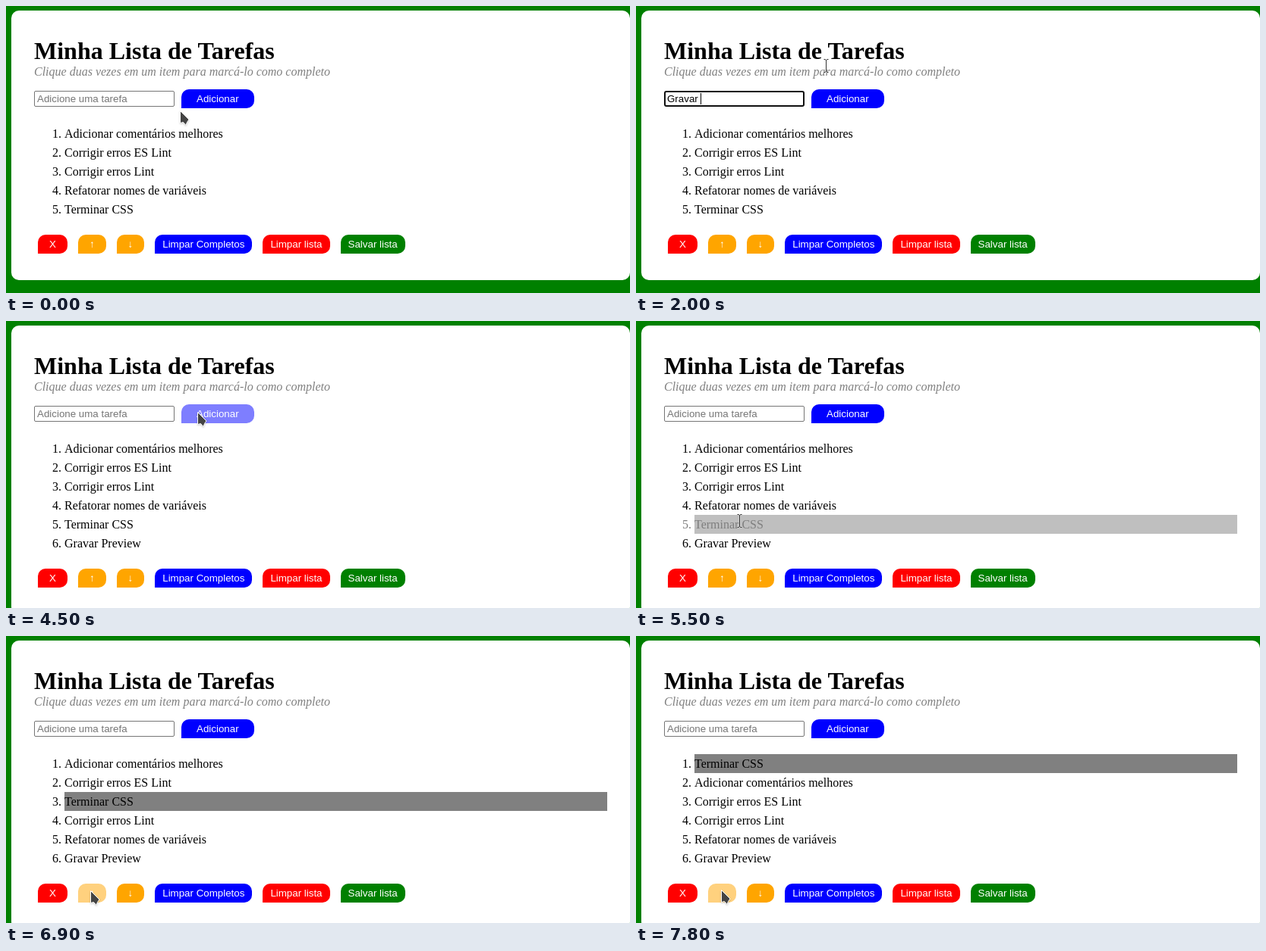
An HTML page that plays this animation: 822 by 379 pixels, repeating every 8 s.

```html
<!DOCTYPE html>
<html lang="pt">
<head>
<meta charset="utf-8">
<style>
html, body { margin: 0; width: 100%; height: 100%; overflow: hidden; background: green; }
body { position: relative; font: 16px "Liberation Serif", serif; color: #000; }
body > * { position: absolute; margin: 0; white-space: pre; }
#card { left: 7px; top: 6px; width: 815px; height: 356px; border-radius: 10px; background: #fff; }
h1 { left: 37px; top: 41px; font-size: 32px; }
#hint { left: 37px; top: 78px; font-style: italic; color: gray; }
#field, .btn { font: 13.3333px/15px "Liberation Sans", sans-serif; }
#field { left: 37px; top: 112px; width: 185px; height: 21px; box-sizing: border-box;
  border: 1px solid #767676; border-radius: 2px; padding: 2px 3px; background: #fff; }
#field.focus { border: 2px solid #101010; border-radius: 3px; padding: 1px 2px; }
#caret { position: absolute; width: 1px; height: 15px; background: #000; }
#placeholder { color: #757575; }
.btn { padding: 5px 10px; border-radius: 10px 10px 10px 0; color: #fff; background: blue; }
#add { left: 231px; top: 110px; padding: 5px 20px; }
#bar { left: 42px; top: 302px; display: flex; gap: 14px; }
.narrow { padding: 5px 15px; }
.red { background: red; }
.orange { background: orange; }
.green { background: green; }
ol { left: 37px; top: 156px; width: 755px; box-sizing: border-box; padding: 0 0 0 40px; line-height: 25px; }
li.selected { background: gray; }
.hover { opacity: .5; }
#cursor { left: 0; top: 0; overflow: visible; }
#arrow { filter: drop-shadow(0 1px 1px rgba(0, 0, 0, .2)); }
</style>
</head>
<body>
<div id="card"></div>
<h1>Minha Lista de Tarefas</h1>
<div id="hint">Clique duas vezes em um item para marcá-lo como completo</div>
<div id="field"><span id="typed"></span><i id="caret"></i><span id="placeholder">Adicione uma tarefa</span></div>
<div id="add" class="btn">Adicionar</div>
<ol><li></li><li></li><li></li><li></li><li></li><li></li></ol>
<div id="bar"><span class="btn narrow red">X</span><span class="btn narrow orange">↑</span><span class="btn narrow orange">↓</span><span class="btn">Limpar Completos</span><span class="btn red">Limpar lista</span><span class="btn green">Salvar lista</span></div>
<svg id="cursor" width="1" height="1">
  <path id="arrow" d="M.5 .5V16.5L4.5 15.5L8 19.5L9.5 15.5L12 12Z" fill="#444" stroke="#fff"/>
  <g id="beam" fill="none">
    <path d="M-2.5 -8.5H-1L.5 -7.5L2 -8.5H3.5M.5 -7.5V7.5M-2.5 8.5H-1L.5 7.5L2 8.5H3.5" stroke="#fff" stroke-width="2" opacity=".5"/>
    <path d="M-2.5 -8.5H-1L.5 -7.5L2 -8.5H3.5M.5 -7.5V7.5M-2.5 8.5H-1L.5 7.5L2 8.5H3.5" stroke="#333"/>
  </g>
</svg>
<script>
const LOOP = 8000, STEP = 100;
const NEW_TASK = 'Gravar Preview', MOVED = 'Terminar CSS';
const TASKS = ['Adicionar comentários melhores', 'Corrigir erros ES Lint', 'Corrigir erros Lint', 'Refatorar nomes de variáveis'];
const ADDED = 4400, SELECTED = 5500;
const MOVES_UP = [6600, 6900, 7400, 7800];
// time of each keystroke; equal times land in the same step
const KEYSTROKES = [1200, 1400, 1500, 1700, 1700, 1900, 2000, 2400, 2900, 2900, 3000, 3200, 3400, 3500];
// time, x, y, pointer shape
const PATH = [
  [0, 229, 138, 'arrow'], [200, 206, 124, 'beam'], [300, 194, 116, 'beam'], [400, 194, 118, 'beam'],
  [500, 194, 118, 'beam'], [700, 250, 79, 'beam'], [3800, 250, 79, 'beam'], [4000, 252, 99, 'arrow'],
  [4200, 252, 120, 'arrow'], [4500, 252, 120, 'arrow'], [4900, 150, 245, 'beam'], [5000, 136, 262, 'beam'],
  [5100, 136, 262, 'beam'], [5200, 136, 266, 'beam'], [5400, 136, 266, 'beam'], [5500, 136, 264, 'beam'],
  [5700, 136, 264, 'beam'], [5800, 134, 283, 'beam'], [5900, 131, 298, 'arrow'], [6200, 123, 330, 'arrow'],
  [6400, 123, 330, 'arrow'], [6600, 111, 336, 'arrow'], [7600, 111, 336, 'arrow'], [7700, 112, 335, 'arrow'],
  [LOOP, 112, 335, 'arrow']
];

const $ = id => document.getElementById(id);
const items = [...document.querySelectorAll('li')];
const hoverables = [...items, ...document.querySelectorAll('.btn')];
const show = (el, on) => { el.style.display = on ? '' : 'none'; };
const countPassed = (times, t) => times.filter(time => time <= t).length;

function pointerAt(t) {
  const next = PATH.findIndex(key => key[0] > t);
  const [t0, x0, y0, shape] = PATH[next - 1], [t1, x1, y1] = PATH[next];
  const k = (t - t0) / (t1 - t0);
  return { x: Math.round(x0 + (x1 - x0) * k), y: Math.round(y0 + (y1 - y0) * k), shape };
}

function drawField(t) {
  const focused = t >= 400 && t < ADDED;
  const typed = focused ? NEW_TASK.slice(0, countPassed(KEYSTROKES, t)) : '';
  const blinkedOff = (t >= 1000 && t < 1200) || t >= 4000;
  $('field').className = focused ? 'focus' : '';
  $('typed').textContent = typed;
  show($('caret'), focused && !blinkedOff);
  show($('placeholder'), !typed);
}

function drawList(t) {
  const position = TASKS.length - countPassed(MOVES_UP, t);
  const tasks = [...TASKS];
  tasks.splice(position, 0, MOVED);
  if (t >= ADDED) tasks.push(NEW_TASK);
  items.forEach((item, i) => {
    show(item, i < tasks.length);
    item.textContent = tasks[i] || '';
    item.classList.toggle('selected', t >= SELECTED && i === position);
  });
  $('card').style.height = 231 + 25 * tasks.length + 'px';
  $('bar').style.top = 177 + 25 * tasks.length + 'px';
}

function drawPointer(t) {
  const { x, y, shape } = pointerAt(t);
  $('cursor').style.transform = `translate(${x}px, ${y}px)`;
  show($('arrow'), shape === 'arrow');
  show($('beam'), shape === 'beam');
  for (const el of hoverables) {
    const box = el.getBoundingClientRect();
    el.classList.toggle('hover', x >= box.left && x < box.right && y >= box.top && y < box.bottom);
  }
}

function frame() {
  const t = Math.floor(performance.now() % LOOP / STEP) * STEP;
  drawField(t);
  drawList(t);
  drawPointer(t);
  requestAnimationFrame(frame);
}
frame();
</script>
</body>
</html>
```
